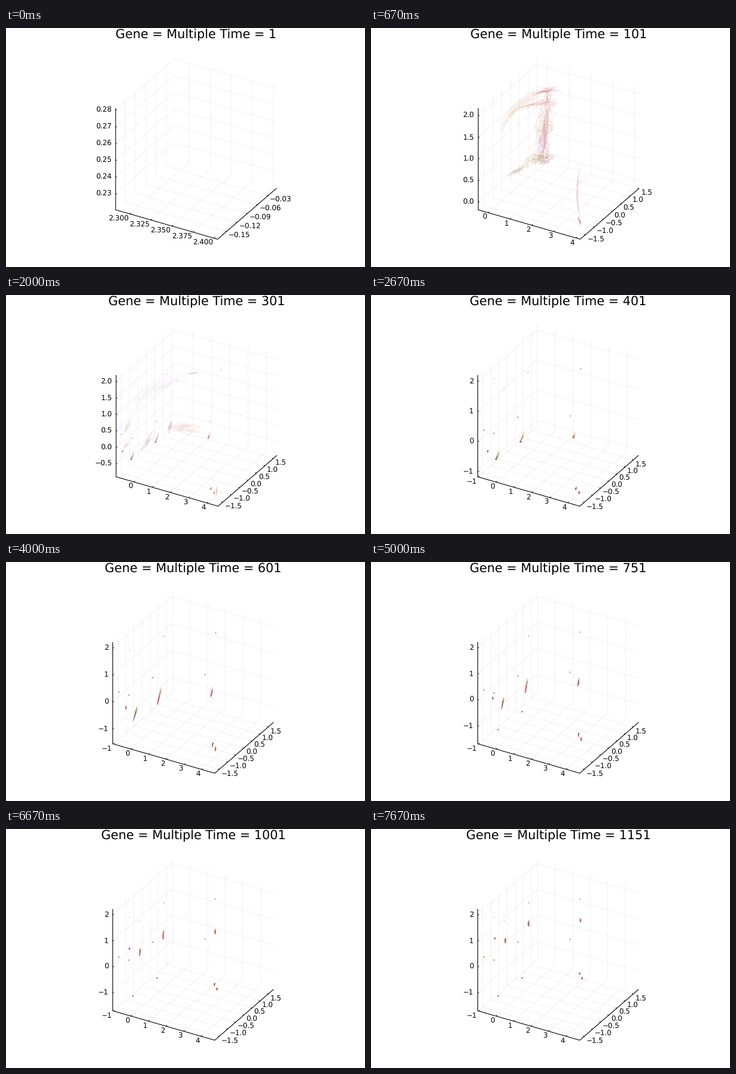
These frames come from a looping animation (600x400 px, 8 s). A matplotlib script:

```python
import matplotlib.pyplot as plt
import numpy as np
from matplotlib.animation import FuncAnimation
from matplotlib.collections import LineCollection

W, H = 600, 400
STEPS, LOOP_MS, TICK_MS = 24, 8000, 50
PX = 0.72  # points per pixel at 100 dpi

plt.rcParams.update({"font.family": "DejaVu Sans", "text.hinting": "none"})
fig = plt.figure(figsize=(W / 100, H / 100), dpi=100, facecolor="white")
ax = fig.add_axes([0, 0, 1, 1])

# Screen vectors of the box edges
EX, EY, EZ = np.array([170.5, 49.2]), np.array([98.4, -85.2]), np.array([0, -170.3])

RED, ROSE, OLIVE, GOLD = "#cf3346", "#d9577f", "#85851a", "#b99a35"
PURPLE, MAGENTA, ORANGE, BROWN = "#8c3fb0", "#8c1450", "#df8058", "#a2553c"

# Clouds of paths: start, end, sideways bend, spread, alpha, colours
EARLY = [
    ((298, 104), (284, 222), 0, 8, .13, [ROSE, RED, GOLD, ROSE, PURPLE]),
    ((264, 222), (306, 216), 0, 6, .11, [ROSE, OLIVE, GOLD, PURPLE]),
    ((262, 112), (315, 103), -2, 2.5, .13, [GOLD, ROSE, RED]),
    ((240, 140), (312, 123), -5, 3, .1, [GOLD, ROSE, RED]),
    ((213, 180), (300, 106), -16, 4, .07, [OLIVE, GOLD, ROSE]),
    ((228, 248), (268, 224), 0, 2.5, .1, [PURPLE, OLIVE, GOLD]),
    ((352, 222), (351, 332), 7, 1, .07, [ROSE, RED, BROWN]),
    ((347, 316), (351, 332), 0, 1, .12, [RED, BROWN]),
]
MIDDLE = [
    ((270, 224), (329, 229), -5, 4.5, .11, [ORANGE, RED, GOLD]),
    ((270, 232), (278, 211), 0, 1.6, .16, [PURPLE]),
    ((222, 265), (248, 230), 0, 2.5, .12, [PURPLE, OLIVE, PURPLE]),
    ((195, 237), (209, 207), 0, 2, .11, [OLIVE, GOLD, ROSE]),
    ((193, 259), (209, 245), 0, 1.5, .09, [PURPLE, ROSE]),
    ((303, 132), (323, 130), 0, .8, .13, [PURPLE]),
    ((205, 195), (302, 132), -8, 6, .04, [ROSE, PURPLE]),
    ((352, 318), (352, 339), 0, .7, .16, [RED, BROWN]),
]

# Rising bundles: start, end, phase difference inside the bundle, colours
BUNDLES = [
    ((209, 275), (224.5, 187), .2, [ROSE, PURPLE, OLIVE, GOLD]),
    ((250, 246), (263.5, 158), .22, [PURPLE, RED, ORANGE, OLIVE]),
    ((338, 239), (350, 153), .14, [ORANGE, RED, RED, ORANGE]),
    ((342, 325), (348.5, 242), .06, [RED, BROWN]),
    ((348, 332), (353, 250), .06, [BROWN, RED]),
    ((195, 262), (207, 183), .06, [PURPLE, ROSE]),
]

# Resting cells in data space: position, alpha, colour
CELLS = [
    ((-.8, -1.67, .36), .9, OLIVE), ((-.22, -1.67, .36), .9, OLIVE),
    ((-.45, .04, .06), .8, RED), ((1, 1.67, -.42), .7, BROWN),
    ((1.58, 1.67, 1.24), .6, RED), ((-.47, .7, 1.23), .5, RED),
    ((-.23, -1.67, 2.18), .2, ROSE), ((-.2, -1.67, 2.02), .25, ROSE),
    ((-.27, -1, 1.5), .25, RED),
]
LATE_CELLS = [((0, -1.67, -.99), .95, MAGENTA), ((0, -.2, -1.1), .95, MAGENTA)]


def ramp(step, begin, end):
    return float(np.clip((step - begin) / (end - begin), 0, 1))


def limits(step):
    """Range and tick spacing of each axis."""
    if step == 0:
        return {"x": (2.2833, 2.404, .025), "y": (-.176, -.005, .03), "z": (.2203, .281, .01)}
    age = max(step - 2, 0)
    settle = 1 - (1 - ramp(step, 2, 16)) ** 1.9
    z_low, z_high = -.187 - 1.523 * settle, 2.17 + .04 * settle
    return {
        "x": (-1.04 + .59 * np.exp(-age / 1.85), 4.78 - .57 * np.exp(-age / 3.5), 1),
        "y": (-1.78, 1.505 + .325 * ramp(step, 4, 7), .5),
        "z": (z_low, z_high, 1 if z_high - z_low > 3.1 else .5),
    }


def ticks(low, high, spacing):
    """Pairs of position along the edge (0 to 1) and label."""
    digits = {1: 0, .5: 1, .025: 3}.get(spacing, 2)
    values = np.arange(np.ceil(low / spacing), np.floor(high / spacing) + 1) * spacing
    return [((v - low) / (high - low), f"{v + 0:.{digits}f}".replace("-", "−")) for v in values]


def origin(step, spans):
    """Left corner of the box; wider z labels push it to the right."""
    if step == 0:
        return np.array([183.2, 304.3])
    low, _, spacing = spans["z"]
    left = 178.4 if spacing == 1 else 184 if low < -.5 else 179.2
    return np.array([left, 304.3])


def lines(segments, width, colors, alpha=None):
    ax.add_collection(LineCollection(segments, linewidths=width * PX, colors=colors, alpha=alpha))


def label(x, y, text, ha):
    ax.text(x, y - .6, text, size=11.9 * PX, ha=ha, va="center_baseline")


def draw_box(step, spans, o):
    front = o + EX
    grid, marks = [], []
    for f, text in ticks(*spans["x"]):
        p = o + f * EX
        grid += [(p, p + EY), (p + EY, p + EY + EZ)]
        marks.append((p, p + EY * .018))
        label(p[0] - 2, p[1] + 7.3, text, "right")
    for f, text in ticks(*spans["y"]):
        p = o + f * EY
        grid += [(p, p + EX), (p, p + EZ)]
        marks.append((p + EX, p + EX * .988))
        label(p[0] + EX[0] + 3.4, p[1] + EX[1] + 6.6, text, "left")
    for f, text in ticks(*spans["z"]):
        p = o + f * EZ
        grid += [(p, p + EY), (p + EY, p + EY + EX)]
        marks.append((p, p + EX * .012))
        label(p[0] - 6.7, p[1], text, "right")
    lines(grid, .8, (0, 0, 0, .07))
    lines(marks, 1, "black")
    lines([(o + EZ, o, front, front + EY)], 1.1, "black")
    ax.text((o[0] + front[0] + EY[0]) / 2, 18, f"Gene = Multiple Time = {1 + 50 * step}",
            size=20.75 * PX, ha="center", va="baseline")


def draw_strands(curve, count, spread, alpha, colors, seed):
    """Short random walks that follow curve(t), coloured by their place on it."""
    rng = np.random.default_rng(seed)
    length = rng.uniform(.15, .55, (count, 1))
    begin = rng.uniform(0, 1 - length)
    t = begin + length * np.linspace(0, 1, 45)
    walk = rng.normal(0, .13, (count, 45, 2)).cumsum(axis=1) + rng.normal(0, .6, (count, 1, 2))
    place = np.clip(begin + length / 2 + rng.normal(0, .15, (count, 1)), 0, .999).ravel()
    shades = [colors[int(p * len(colors))] for p in place]
    lines(curve(t) + spread * walk, .75, shades, alpha)


def draw_clouds(clouds, strength):
    if strength == 0:
        return
    for seed, (start, end, bend, spread, alpha, colors) in enumerate(clouds):
        start, along = np.array(start), np.subtract(end, start)
        side = np.array([-along[1], along[0]]) / np.hypot(*along)

        def curve(t):
            t = t[..., None]
            return start + along * t + side * bend * 4 * t * (1 - t)

        draw_strands(curve, int(12 + 7 * spread), spread, alpha * strength, colors, seed)


def draw_bundles(step, strength):
    phase = ramp(step, 8, 23)
    for seed, (start, end, lag, colors) in enumerate(BUNDLES):
        reach = lag * (1 - .75 * phase)

        def curve(t):
            u = np.clip(phase + reach * (2 * t - 1), 0, 1.1)
            eased = np.stack([1 - (1 - u) ** 2, u ** 1.1], axis=-1)
            return np.array(start) + np.subtract(end, start) * eased

        draw_strands(curve, int(12 + 80 * lag), .65, .3 * strength, colors, 50 + seed)


def draw_cells(step, spans, o, strength):
    for position, alpha, color in CELLS + (LATE_CELLS if step >= 14 else []):
        x, y = o + sum((v - low) / (high - low) * edge for v, (low, high, _), edge
                       in zip(position, spans.values(), (EX, EY, EZ)))
        ax.plot(x, y, "o", ms=2.2 * PX, mew=0, color=color, alpha=alpha * strength)


def draw(tick):
    # Step times are rounded, so a step may start a little before its third of a second
    step = (tick * TICK_MS + 34) * STEPS // LOOP_MS
    ax.clear()
    ax.set(xlim=(0, W), ylim=(H, 0))
    ax.axis("off")
    spans = limits(step)
    o = origin(step, spans)
    draw_box(step, spans, o)
    if step > 0:
        draw_clouds(EARLY, 1 - ramp(step, 2, 4))
        draw_clouds(MIDDLE, ramp(step, 2, 4) * (1 - ramp(step, 4, 8)))
    strength = ramp(step, 4, 8)
    if strength > 0:
        draw_bundles(step, strength)
        draw_cells(step, spans, o, strength)
    return []


animation = FuncAnimation(fig, draw, frames=LOOP_MS // TICK_MS, interval=TICK_MS,
                          init_func=lambda: [], repeat=True, repeat_delay=0)
plt.show()
```
